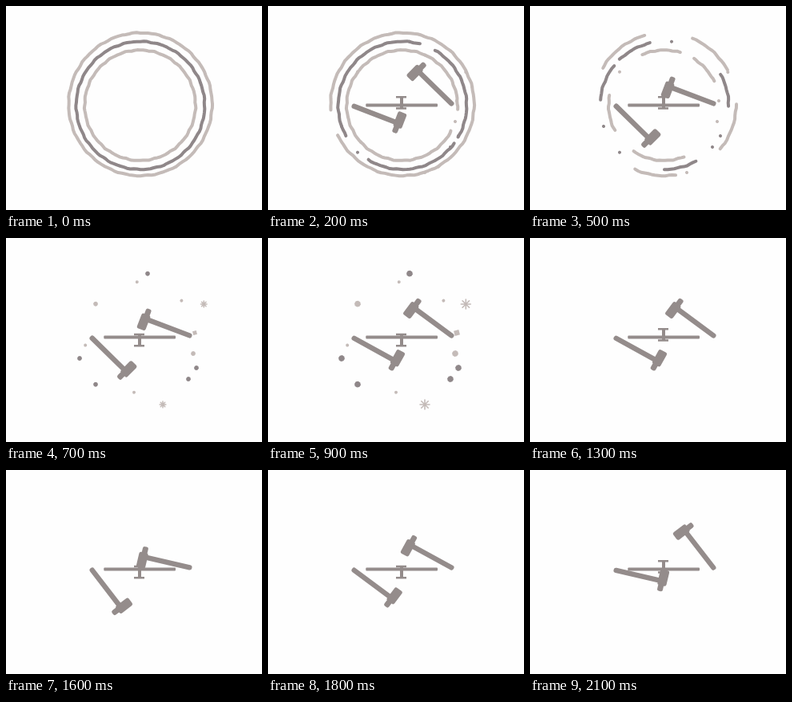
An HTML page with a canvas for the animation above (2.2 s loop, 320 by 256 pixels).

```html
<!DOCTYPE html>
<html lang="en">
<head>
<meta charset="utf-8">
<title>Hammers and anvil</title>
<style>
  html, body { margin: 0; width: 320px; height: 256px; overflow: hidden; background: #fefefe; }
  canvas { display: block; width: 320px; height: 256px; }
</style>
</head>
<body>
<canvas id="stage"></canvas>
<script>
const LOOP = 2200, STEP = 100, RAD = Math.PI / 180;
const LIGHT = '#c4bbb8', DARK = '#8f8789', TOOL = '#948c8b';

// Each gap: opening time, opening angle, then both edges at 500 ms (degrees).
const rings = [
  { x: 168, y: 123.3, r: 89.7, color: LIGHT, end: 700, gaps: [
    [330, 60, 38.7, 81], [116, 165.6, 114.3, 210.6],
    [340, 273.5, 254, 293], [380, 346, 331.4, 360]] },
  { x: 168, y: 124.8, r: 80.3, color: DARK, end: 700, gaps: [
    [163, 33.3, 0.7, 60.6], [64, 136.5, 90, 185],
    [460, 222, 218.4, 226], [125, 293, 257, 331]] },
  { x: 167.6, y: 124.6, r: 69.3, color: LIGHT, end: 1000, gaps: [
    [360, 138, 123.5, 153], [190, 219, 190.5, 246.8],
    [420, 294.5, 286.9, 302.5], [101, 374.1, 334.2, 429]] }
];

const dots = [
  [177, 44.7, DARK], [238, 163, DARK], [228, 177, DARK], [92, 151, DARK], [112, 183.7, DARK],
  [112, 82.7, LIGHT], [234, 145, LIGHT], [236, 119, LIGHT, 'square'],
  [247.3, 83, LIGHT, 'star'], [196, 209, LIGHT, 'star']
];

const canvas = document.getElementById('stage');
const ctx = canvas.getContext('2d');
const ratio = window.devicePixelRatio || 1;
canvas.width = 320 * ratio;
canvas.height = 256 * ratio;

const clamp = v => Math.max(0, Math.min(1, v));
const lerp = (a, b, k) => a + (b - a) * k;

function polygon(x, y, r, sides, turn) {
  ctx.beginPath();
  for (let i = 0; i < sides; i++) {
    const a = turn + i * 2 * Math.PI / sides;
    ctx.lineTo(x + r * Math.cos(a), y + r * Math.sin(a));
  }
  ctx.closePath();
  ctx.fill();
}

// Arc with the slight unevenness of a hand-drawn line.
function roughArc(ring, from, to) {
  const n = Math.max(1, Math.ceil((to - from) / 3));
  ctx.beginPath();
  for (let i = 0; i <= n; i++) {
    const a = lerp(from, to, i / n) * RAD;
    const r = ring.r + 0.35 * Math.sin(a * 23 + ring.r) + 0.25 * Math.sin(a * 37);
    ctx.lineTo(ring.x + r * Math.cos(a), ring.y + r * Math.sin(a));
  }
  ctx.stroke();
}

function drawRing(ring, t) {
  if (t >= ring.end) return;
  ctx.strokeStyle = ring.color;
  ctx.lineWidth = 4;
  ctx.lineCap = ctx.lineJoin = 'round';
  if (t === 0) return roughArc(ring, 0, 360);
  const edge = ([t0, a, s, e], side) => lerp(a, side ? e : s, clamp((t - t0) / (500 - t0)));
  const shrink = clamp((t - 500) / 200);
  ring.gaps.forEach((gap, i) => {
    const last = i === ring.gaps.length - 1;
    const next = ring.gaps[last ? 0 : i + 1];
    const from = edge(gap, 1) - (last ? 360 : 0);
    const to = edge(next, 0);
    const mid = (from + to) / 2;
    roughArc(ring, lerp(from, mid, shrink), lerp(to, mid, shrink) + 0.01);
  });
}

function drawStar(x, y, t) {
  if (t >= 1200) return;
  const out = lerp(2.5, 6.8, clamp((t - 500) / 400));
  const inner = t > 900 ? lerp(0, 6, (t - 900) / 300) : 0;
  ctx.lineWidth = 1.6;
  ctx.lineCap = 'round';
  ctx.beginPath();
  for (let i = 0; i < 8; i++) {
    const c = Math.cos(i * 45 * RAD), s = Math.sin(i * 45 * RAD);
    ctx.moveTo(x + c * inner, y + s * inner);
    ctx.lineTo(x + c * (out - 0.8), y + s * (out - 0.8));
  }
  ctx.stroke();
}

function drawDot([x, y, color, kind], t) {
  if (t >= 1300) return;
  ctx.fillStyle = ctx.strokeStyle = color;
  const grown = t <= 900 ? clamp((t - 500) / 400) : 1 - clamp((t - 900) / 300);
  const r = lerp(2, 4, grown);
  if (kind === 'star' && t > 500) drawStar(x, y, t);
  else if (kind === 'square' && t > 600) polygon(x, y, r * 1.15, 4, 30 * RAD);
  else polygon(x, y, r, t > 600 ? 8 : 24, 0.2);
}

function drawHammer(x, y, degrees) {
  ctx.save();
  ctx.translate(x, y);
  ctx.rotate(degrees * RAD);
  ctx.beginPath();
  ctx.roundRect(-3.5, -3.2, 60, 6.4, 3);
  ctx.roundRect(53.5, -14.5, 11.5, 20, 2.5);
  ctx.roundRect(55, 2, 7, 11, 2.5);
  ctx.fill();
  ctx.restore();
}

function drawAnvil(y) {
  ctx.beginPath();
  ctx.rect(160, y, 13, 2.5);
  ctx.rect(165, y + 1, 4, 15);
  ctx.rect(160, y + 14.3, 13, 2.5);
  ctx.fill();
}

function drawTools(t) {
  const phase = ((t + 400) % 1000) / 1000;
  const angle = lerp(13, 52.3, 1 - Math.abs(1 - 2 * phase));
  ctx.fillStyle = TOOL;
  ctx.beginPath();
  ctx.roundRect(122.3, 122.4, 89.7, 4.2, 1);
  ctx.fill();
  drawAnvil(phase < 0.5 ? 119.8 : 113);
  drawHammer(229, 122.2, 180 + angle);
  drawHammer(108, 126, 65.5 - angle);
}

function draw(t) {
  ctx.setTransform(ratio, 0, 0, ratio, 0, 0);
  ctx.fillStyle = '#fefefe';
  ctx.fillRect(0, 0, 320, 256);
  rings.forEach(ring => drawRing(ring, t));
  if (t > 0) {
    dots.forEach(dot => drawDot(dot, t));
    drawTools(t);
  }
}

const start = performance.now();
function tick() {
  const t = (performance.now() - start) % LOOP;
  draw(Math.floor(t / STEP) * STEP);
  requestAnimationFrame(tick);
}
tick();
</script>
</body>
</html>
```
